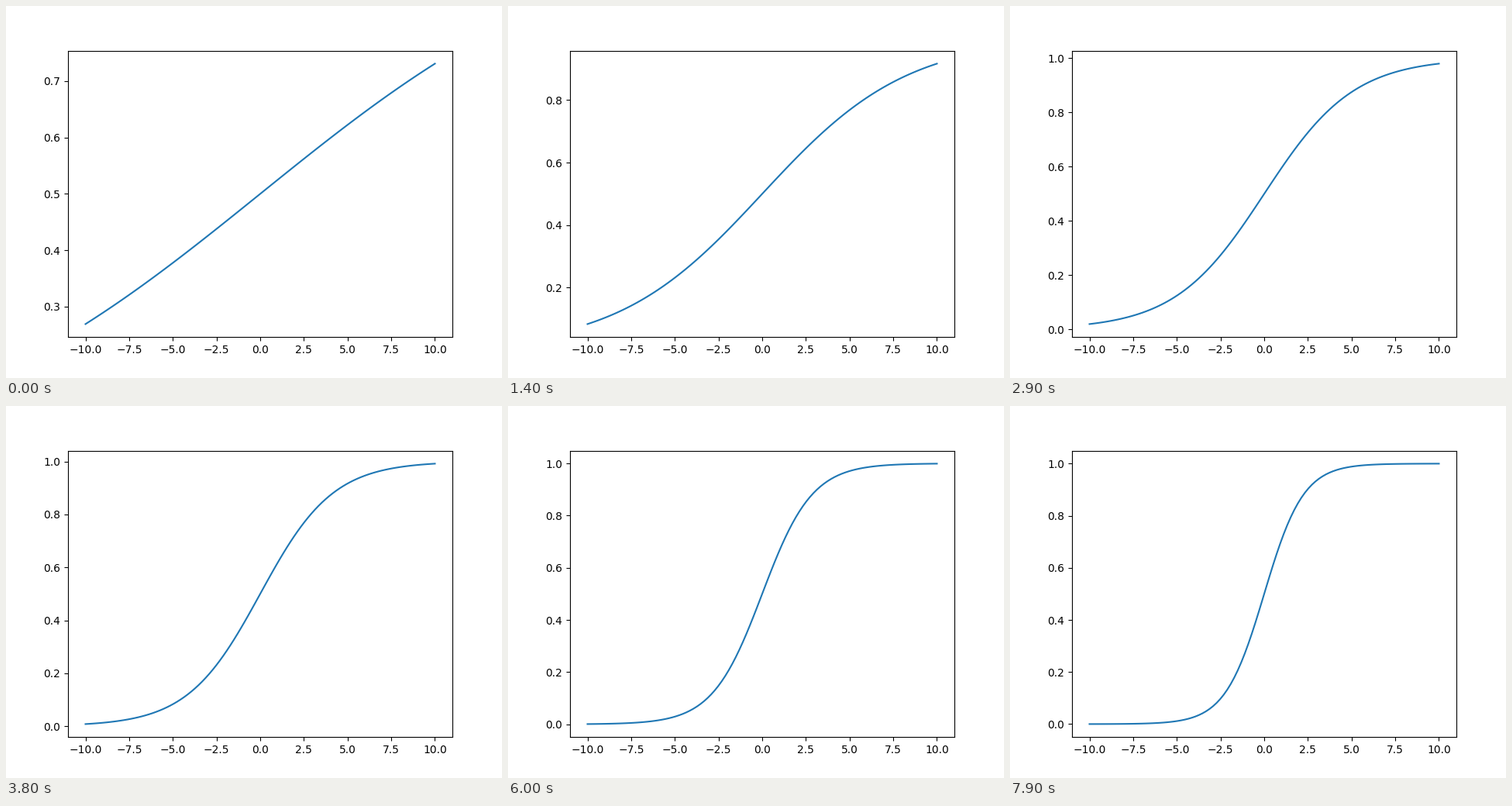
Recreate the animation shown at these times as a matplotlib script. Size 640 by 480 pixels, loop 8 s.

```python
import numpy as np
import matplotlib.pyplot as plt
from matplotlib.animation import FuncAnimation

FRAMES = 80
INTERVAL = 100  # ms

x = np.linspace(-10, 10, 100)


def sigmoid(z):
    return 1 / (1 + np.exp(-z))


fig, ax = plt.subplots(figsize=(6.4, 4.8), dpi=100)
line, = ax.plot(x, sigmoid(0.1 * x))


def update(i):
    """Steepen the curve and refit the axes to it."""
    slope = 0.1 + 0.01 * i
    line.set_ydata(sigmoid(slope * x))
    ax.relim()
    ax.autoscale_view()
    return line,


def init():
    return update(0)


anim = FuncAnimation(fig, update, frames=FRAMES, init_func=init,
                     interval=INTERVAL, repeat=True, repeat_delay=0)

plt.show()
```
